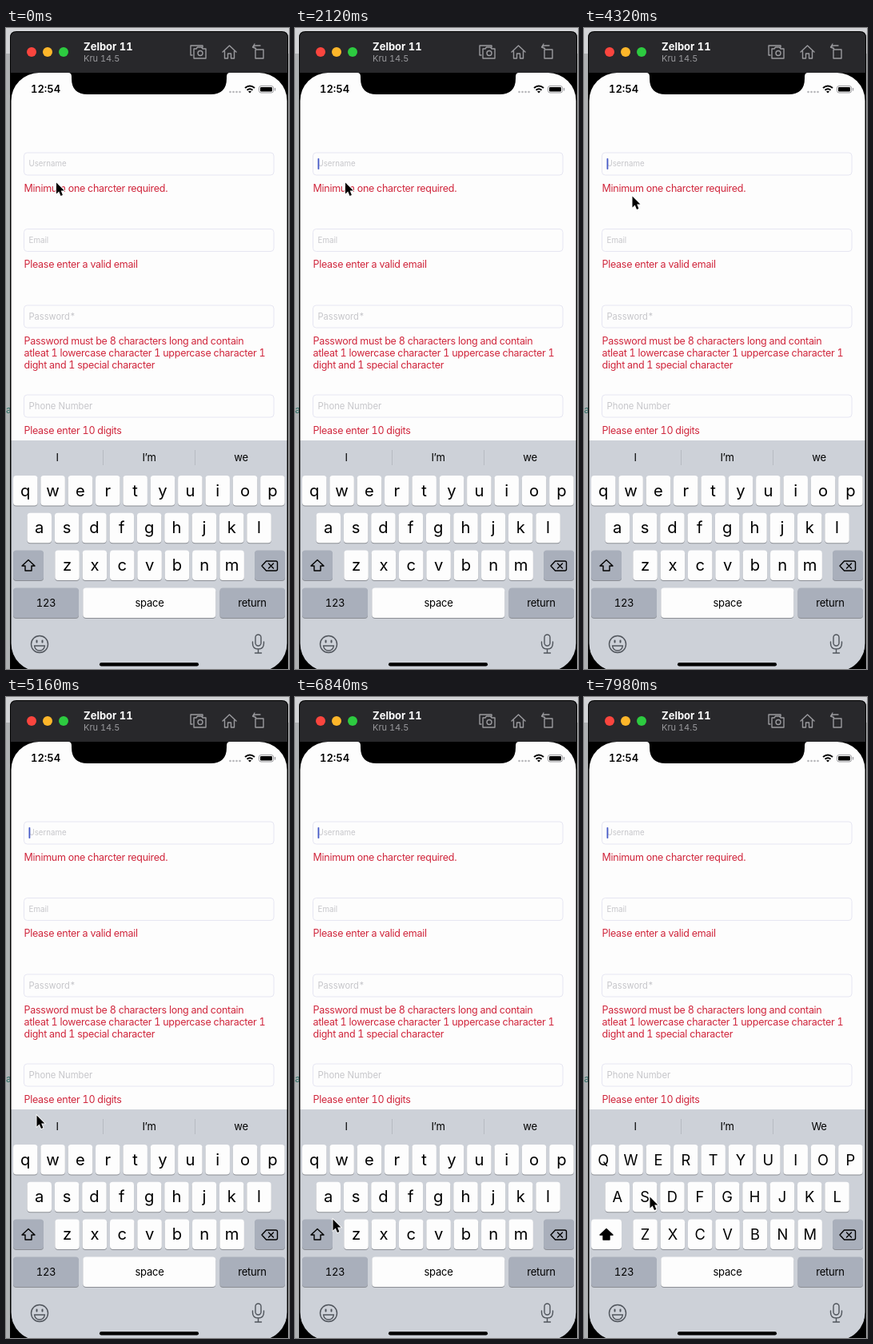
An HTML page for the animation above (8000 ms loop, 354 by 802 pixels).

```html
<!DOCTYPE html>
<html lang="en">
<head>
<meta charset="utf-8">
<title>Form validation</title>
<style>
  html, body { margin: 0; width: 100%; height: 100%; overflow: hidden; }
  svg { display: block; width: 100%; height: 100%; }
  text { font-family: Inter, "Liberation Sans", sans-serif; font-variant-numeric: tabular-nums; }
  .field { fill: #fdfdfd; stroke: #e6e6f2; }
  .hint { fill: #c6c6ca; }
  .error { fill: #d0263c; font-size: 12.5px; letter-spacing: -.022em; }
  .center { text-anchor: middle; }
  .label { font-size: 13px; letter-spacing: -.02em; }
  .icon { fill: none; stroke-width: 1.4; stroke-linecap: round; stroke-linejoin: round; }
</style>
</head>
<body>
<svg viewBox="0 0 354 802" preserveAspectRatio="none">
  <rect width="354" height="802" fill="#d2d3d6"/>
  <path d="M0 32H6V802H0ZM352 32h2v770h-2Z" fill="#aeb0b2"/>
  <text x="0" y="482" font-size="12" fill="#337069">a</text>

  <!-- simulator window -->
  <path d="M5 802V12q0-8 8-8H345q8 0 8 8V802Z" fill="#000"/>
  <path d="M6 56V12q0-7 7-7H345q7 0 7 7V56Z" fill="#28282b"/>
  <circle cx="32" cy="30" r="6" fill="#fa453e"/>
  <circle cx="52" cy="30" r="6" fill="#fdb62a"/>
  <circle cx="72" cy="30" r="6" fill="#2dcb40"/>
  <text x="97" y="28" font-size="13" font-weight="700" fill="#fff">Zelbor 11</text>
  <text x="97" y="42" font-size="11" fill="#98989c">Kru 14.5</text>
  <g class="icon" stroke="#9a9a9e">
    <path d="M233 34h-2V22h15v2M235 26h3l1.5-2h5l1.5 2h4v12h-15Z"/>
    <circle cx="243" cy="31.500" r="3"/>
    <path d="M271 30l8.500-8 8.500 8M273.500 29v9h4v-6h4v6h4v-9"/>
    <path d="M312 27h10v11h-10ZM309 24q1-2 4-2h5M311 20l-2.500 4 4 1.500"/>
  </g>

  <!-- device screen -->
  <clipPath id="screen"><rect x="6.500" y="56" width="345" height="749" rx="35"/></clipPath>
  <g clip-path="url(#screen)">
    <rect y="56" width="354" height="460" fill="#fdfdfd"/>
    <rect y="516" width="354" height="286" fill="#cdd1d8"/>
  </g>
  <path d="M78 56q4 0 4 5v2q0 20 20 20H256q20 0 20-20v-2q0-5 4-5Z" fill="#000"/>
  <text x="31" y="81" font-size="13" font-weight="600">12:54</text>
  <g fill="#b6b6ba">
    <circle cx="280.500" cy="80" r="1.300"/><circle cx="284.500" cy="80" r="1.300"/>
    <circle cx="288.500" cy="80" r="1.300"/><circle cx="292.500" cy="80" r="1.300"/>
  </g>
  <path d="M299 75q6-5 12 0M301.500 77.700q3.500-3 7 0" fill="none" stroke="#000" stroke-width="2"/>
  <path d="M303 79.500q2-1.500 4 0l-2 2Z"/>
  <rect x="316.500" y="72.500" width="18" height="8.500" rx="2.500" fill="none" stroke="#9a9a9e"/>
  <rect x="318" y="74" width="15" height="5.500" rx="1.300"/>
  <path d="M336.500 75v3.500" stroke="#9a9a9e" stroke-width="1.300"/>

  <g id="form"></g>
  <rect id="caret" x="28.500" y="163" width="1.800" height="14" rx=".8" fill="#475bc8"/>

  <path d="M121.500 528v19M236.500 528v19" stroke="#b7bbc2"/>
  <g id="keys"></g>

  <g class="icon" stroke="#50555c">
    <circle cx="42" cy="771" r="10.500"/>
    <path d="M35.500 773h13q-1 6-6.500 6t-6.500-6Z"/>
    <path d="M38.500 766.500v2M45.500 766.500v2" stroke-width="2"/>
    <rect x="312" y="759" width="7" height="14" rx="3.500"/>
    <path d="M308.500 768v2q0 7 7 7t7-7v-2M315.500 777v5M311.500 782h8"/>
  </g>
  <rect x="117" y="794" width="124" height="4.500" rx="2.250"/>
  <path id="pointer" d="M.5 .5V14.500L3.700 11.500 6 17 8.400 16 6.200 10.500H10.400Z"
        fill="#000" stroke="#fff" stroke-width="1.600" paint-order="stroke"/>
</svg>
<script>
const SVG = 'http://www.w3.org/2000/svg';
const byId = id => document.getElementById(id);
const form = byId('form'), keys = byId('keys');

function add(parent, tag, attrs, content = '') {
  const node = document.createElementNS(SVG, tag);
  for (const name in attrs) node.setAttribute(name, attrs[name]);
  node.textContent = content;
  parent.append(node);
  return node;
}

function addField(y, hint, size, ...errors) {
  add(form, 'rect', { class: 'field', x: 22.5, y: y + .5, width: 312.5, height: 28, rx: 4 });
  add(form, 'text', { class: 'hint', x: 28.5, y: y + 14.5 + size * .36, 'font-size': size }, hint);
  errors.forEach((line, i) =>
    add(form, 'text', { class: 'error', x: 22.5, y: y + 49 + i * 15 }, line));
}
addField(155.5, 'Username', 9.7, 'Minimum one charcter required.');
addField(251, 'Email', 9.8, 'Please enter a valid email');
addField(346.5, 'Password*', 11.1, 'Password must be 8 characters long and contain',
  'atleat 1 lowercase character 1 uppercase character 1', 'dight and 1 special character');
addField(458.5, 'Phone Number', 11.3, 'Please enter 10 digits');

const WHITE = '#fdfdfd', GRAY = '#a9afbb';
function addKey(x, y, width, fill) {
  add(keys, 'rect', { x, y: y + 1, width, height: 37.5, rx: 4, fill: '#8b8e94' });
  return add(keys, 'rect', { x, y, width, height: 37.5, rx: 4, fill });
}
const addLabel = (x, y, label) => add(keys, 'text', { class: 'center label', x, y }, label);

const letters = [];
[['qwertyuiop', 9], ['asdfghjkl', 26.5], ['zxcvbnm', 61.3]].forEach(([row, left], r) => {
  [...row].forEach((char, i) => {
    const x = left + i * 34.35, y = 560 + r * 46.8;
    addKey(x, y, 30.5, WHITE);
    letters.push([char, add(keys, 'text', { class: 'center', x: x + 15.25, y: y + 25.5 })]);
  });
});

addLabel(64, 542, 'I');
addLabel(179, 542, 'I’m');
const suggestion = addLabel(294, 542, 'we');
const shiftKey = addKey(9, 653.6, 38, GRAY);
const shiftArrow = add(keys, 'path', {
  class: 'icon', stroke: '#000', d: 'M28 665.5l8 7.5h-4v6h-8v-6h-4Z'
});
addKey(311, 653.6, 38, GRAY);
add(keys, 'path', {
  class: 'icon', stroke: '#000', d: 'M320 673l5.5-6h12q2 0 2 2v8q0 2-2 2h-12ZM328.5 670l6 6M334.5 670l-6 6'
});
addKey(9, 700.5, 82, GRAY);
addKey(96.3, 700.5, 166, WHITE);
addKey(267.5, 700.5, 81.5, GRAY);
addLabel(50, 723.5, '123');
addLabel(179.5, 723.5, 'space');
addLabel(308, 723.5, 'return');

let capsShown = null;
function setCaps(caps) {
  if (caps === capsShown) return;
  capsShown = caps;
  for (const [char, node] of letters) {
    node.textContent = caps ? char.toUpperCase() : char;
    node.setAttribute('font-size', caps ? 18.3 : 20.2);
  }
  suggestion.textContent = caps ? 'We' : 'we';
  shiftKey.setAttribute('fill', caps ? WHITE : GRAY);
  shiftArrow.style.fill = caps ? '#000' : 'none';
}

// Pointer stops: time, x, y
const path = [
  [4180, 62.5, 193], [4320, 60, 210], [4900, 34, 508], [5160, 38, 523],
  [5500, 38, 540], [6500, 47, 653], [6900, 47, 653], [7350, 33, 668],
  [7680, 33, 668], [7940, 82, 625]
];
const smooth = p => { p = Math.min(1, Math.max(0, p)); return p * p * (3 - 2 * p); };

function pointerAt(t) {
  let [, x, y] = path[0];
  for (let i = 1; i < path.length; i++) {
    const [from, x0, y0] = path[i - 1], [to, x1, y1] = path[i];
    if (t < from) break;
    const p = smooth((t - from) / (to - from));
    x = x0 + (x1 - x0) * p;
    y = y0 + (y1 - y0) * p;
  }
  return [x, y];
}

function caretOpacity(t) {
  const phase = (t + 2600) % 3000;
  return smooth(phase / 200) - smooth((phase - 1780) / 200);
}

const LOOP = 8000, CAPS_AT = 7620;
const start = performance.now();
function draw() {
  const t = (performance.now() - start) % LOOP;
  byId('pointer').setAttribute('transform', `translate(${pointerAt(t)})`);
  byId('caret').setAttribute('opacity', caretOpacity(t));
  setCaps(t >= CAPS_AT);
  requestAnimationFrame(draw);
}
draw();
</script>
</body>
</html>
```
